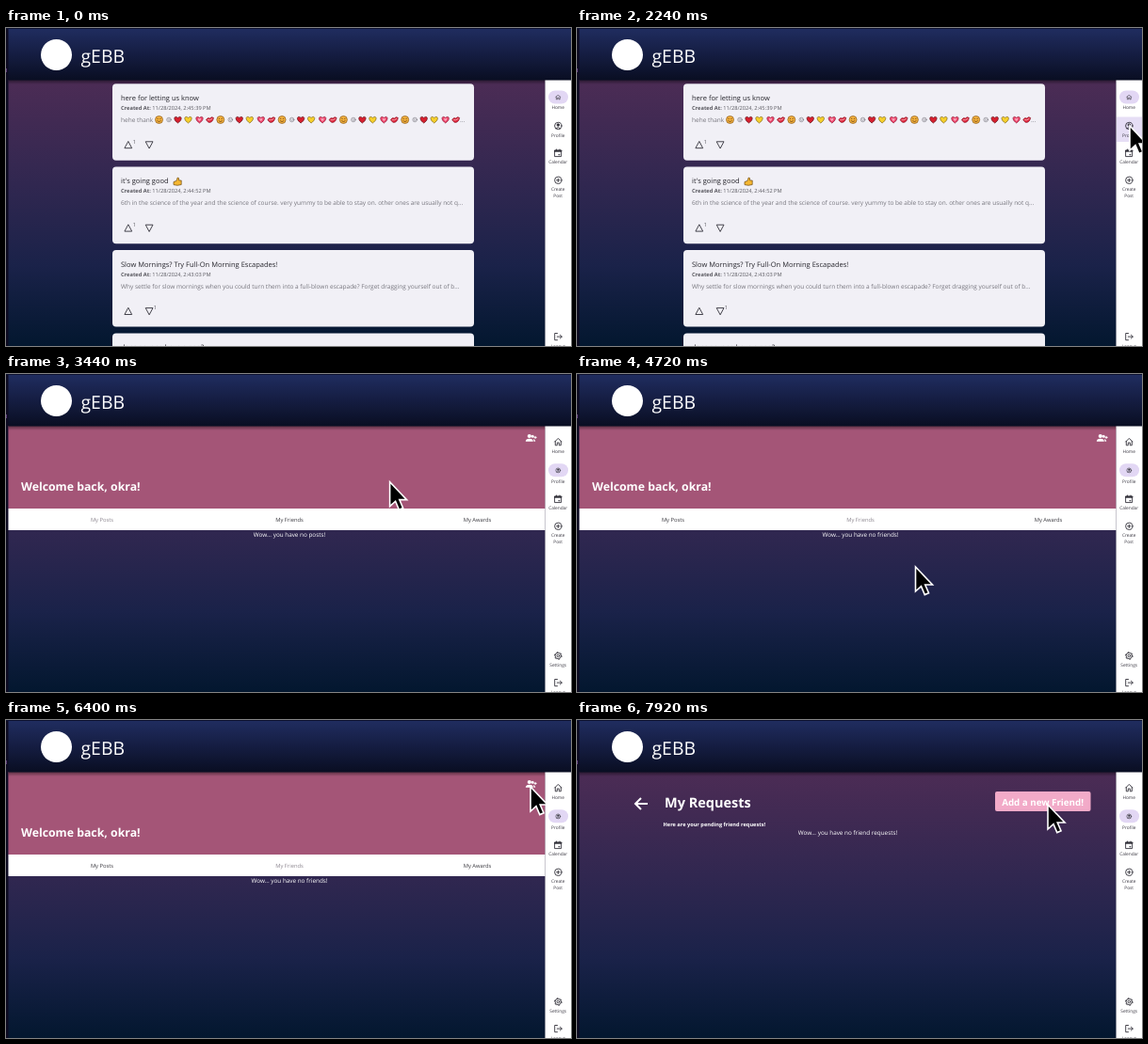
An HTML page for the animation above (8 s loop, 600 by 338 pixels).

```html
<!DOCTYPE html>
<html lang="en">
<head>
<meta charset="utf-8">
<style>
  html, body { margin: 0; width: 100%; height: 100%; overflow: hidden; background: #0c0a20; }
  svg { display: block; width: 600px; height: 338px; font-family: "Open Sans", "Noto Sans", sans-serif; text-rendering: geometricPrecision; }
  .line { fill: none; stroke: #33323a; stroke-width: .9; stroke-linejoin: round; stroke-linecap: round; }
  .mid { text-anchor: middle; }
  .white { fill: #fff; }
  .bold { font-weight: 700; }
  .title { font-size: 7.5px; font-weight: 500; fill: #26252c; }
  .date { font-size: 5.7px; fill: #5a5960; }
  .body { font-size: 6.5px; fill: #77767e; }
  .nav { font-size: 4.8px; fill: #3c3a44; text-anchor: middle; }
  .tab { font-size: 5.8px; font-weight: 500; text-anchor: middle; fill: #3b3a40; }
  .tab.on { fill: #8d8790; }
  .note { font-size: 6.35px; font-weight: 500; fill: #fff; text-anchor: middle; }
</style>
</head>
<body>
<svg viewBox="0 0 600 338">
  <defs>
    <linearGradient id="page" x2="0" y2="1">
      <stop stop-color="#4c2c55"/><stop offset=".4" stop-color="#302750"/>
      <stop offset=".7" stop-color="#1a2249"/><stop offset="1" stop-color="#03172f"/>
    </linearGradient>
    <linearGradient id="bar" x2="0" y2="1">
      <stop stop-color="#202d60"/><stop offset=".5" stop-color="#151d42"/><stop offset="1" stop-color="#090e22"/>
    </linearGradient>
    <linearGradient id="shade" x2="0" y2="1">
      <stop stop-color="#000" stop-opacity=".45"/><stop offset="1" stop-color="#000" stop-opacity="0"/>
    </linearGradient>
    <path id="heart" d="M0 3.5C-6.5-1-3-5.2 0-2C3-5.2 6.5-1 0 3.5Z"/>
    <g id="smile">
      <circle r="4" fill="#f3b13c" stroke="#8a5a1c" stroke-width=".7"/>
      <path d="M-2-1h1.2M.8-1H2M-2 1Q0 3.2 2 1" fill="none" stroke="#6b3f12" stroke-width=".8"/>
    </g>
    <g id="face" class="line" style="stroke:#77767e;stroke-width:.6">
      <circle r="2.3"/><path d="M-1 .5Q0 1.6 1 .5M-.8-.7v.1M.8-.7v.1"/>
    </g>
    <g id="lips">
      <path d="M-4 0Q-2-3 0-1.4Q2-4 4-2Q3 3-1 3Q-3 2-4 0Z" fill="#e0263c" stroke="#7c1424" stroke-width=".6"/>
      <path d="M-2.5 .2Q0 1 2.7-1.2" fill="none" stroke="#fff" stroke-width=".6"/>
    </g>
  </defs>

  <rect x="2.5" y="55" width="570" height="283" fill="url(#page)"/>
  <g id="home"></g>

  <g id="profile">
    <rect x="2.5" y="55" width="570" height="88" fill="#a45577"/>
    <g class="white">
      <circle cx="555.8" cy="66" r="2.1"/><path d="M551.8 71.8q0-3 4-3t4 3z"/>
      <circle cx="559.2" cy="66.2" r="1.5"/><path d="M560 69q2.2.5 2.2 2.8h-1.6z"/>
      <path d="M560.6 67.4h3M562.1 65.9v3" stroke="#fff"/>
    </g>
    <text class="white bold" x="16" y="123.5" font-size="12.3">Welcome back, okra!</text>
    <rect x="2.5" y="143" width="570" height="23" fill="#fff"/>
    <text class="tab" x="102" y="156.7">My Posts</text>
    <text class="tab" x="301" y="156.7">My Friends</text>
    <text class="tab" x="500.5" y="156.7">My Awards</text>
    <text class="note" x="301" y="173.2" id="empty"></text>
  </g>

  <g id="requests">
    <path d="M75 89H62.5M68 83l-6 6l6 6" fill="none" stroke="#fff" stroke-width="2"/>
    <text class="white bold" x="93" y="93" font-size="14.5">My Requests</text>
    <text class="white bold" x="91.5" y="112.6" font-size="5.63">Here are your pending friend requests!</text>
    <text class="note" x="287.5" y="122.3">Wow... you have no friend requests!</text>
    <rect id="button" x="444" y="76" width="101.5" height="21" rx="2"/>
    <text class="white bold mid" x="494.6" y="90.5" font-size="9.75">Add a new Friend!</text>
  </g>

  <rect x="2.5" y="55" width="570" height="5" fill="url(#shade)"/>
  <rect x="2.5" width="598" height="55.5" fill="url(#bar)"/>
  <rect width="600" height="1" fill="#0d1230"/>
  <rect y="43" width="1" height="4" fill="#5b3a78"/>
  <circle class="white" cx="53.5" cy="28.5" r="16.5"/>
  <text class="white" x="79.5" y="37" font-size="19.4">gEBB</text>

  <rect x="572.5" y="55.5" width="27.5" height="283" fill="#fff"/>
  <rect id="hover" x="573" y="94.5" width="27" height="26.5" fill="#e6def5"/>
  <rect id="pill" x="576" width="21" height="14" rx="7" fill="#e2d7f4"/>
  <path id="homeIcon" class="line" d="M-3.6 0L0-3.6L3.6 0M-3-.6V3.8H-1V1H1V3.8H3V-.6"/>
  <text class="nav" id="homeLabel" x="586.2">Home</text>
  <g id="userIcon" class="line">
    <circle r="3.7"/><circle cy="-1" r="1.2" fill="#33323a"/><path d="M-2.4 2.6Q0 .4 2.4 2.6"/>
  </g>
  <text class="nav" x="586.2" y="115.7">Profile</text>
  <g class="line">
    <path d="M583 130h6.6v6.6H583zM583 131h6.6M584.5 129v1M588 129v1"/>
    <path d="M583 130.6h6.6" stroke-width="1.8"/><path d="M587.3 134.4h.6v.6h-.6z"/>
    <circle cx="586.3" cy="161.8" r="3.7"/><path d="M584.6 161.8h3.4M586.3 160.1v3.4"/>
  </g>
  <text class="nav" x="586.2" y="144.3">Calendar</text>
  <text class="nav" x="586.2" y="173.2">Create</text>
  <text class="nav" x="586.2" y="180.2">Post</text>
  <g id="settings">
    <g class="line">
      <circle cx="586.3" cy="299.5" r="3.2"/><circle cx="586.3" cy="299.5" r="1.3"/>
      <circle cx="586.3" cy="299.5" r="3.9" stroke-dasharray="1.6 2.48" stroke-linecap="butt"/>
    </g>
    <text class="nav" x="586.2" y="311.3">Settings</text>
  </g>
  <path class="line" d="M585.5 324.5H582.7V331.7H585.5M585.3 328.1H590.2M588.4 326.2L590.3 328.1L588.4 330"/>
  <text class="nav" x="586.2" y="339.6">Logout</text>

  <path id="cursor" d="M0 0V26L6 20.6L9.8 29.6L14 27.8L10.2 19H18Z" fill="#000" stroke="#fff" stroke-width="1.6"/>
</svg>
<script>
const $ = id => document.getElementById(id);
const show = (id, on) => $(id).style.display = on ? '' : 'none';

function emojiRow(y) {
  const glyph = (id, x, fill, line) =>
    `<use href="#${id}" x="${x}" y="${y}" fill="${fill}" stroke="${line}" stroke-width=".7"/>`;
  let out = '';
  for (let i = 0; i < 5; i++) {
    const x = 162.5 + i * 65.3;
    out += glyph('smile', x) + glyph('face', x + 10.5) +
      glyph('heart', x + 20, '#d8202f', '#5c0d16') +
      glyph('heart', x + 31, '#f7d02c', '#7d6312') +
      glyph('heart', x + 43, '#f0466c', '#8e1c38') +
      `<use href="#heart" fill="#f9a3b8" transform="translate(${x + 43} ${y}) scale(.45)"/>` +
      glyph('lips', x + 54);
  }
  return out;
}

const posts = [
  ['here for letting us know', '2:45:39', 'hehe thank', 1, 0],
  ["it's going good", '2:44:52', '6th in the science of the year and the science of course. very yummy to be able to stay on. other ones are usually not q...', 1, 0],
  ['Slow Mornings? Try Full-On Morning Escapades!', '2:43:03', 'Why settle for slow mornings when you could turn them into a full-blown escapade? Forget dragging yourself out of b...', 0, 1],
  ['does anyone have a pen?', '2:41:20', '', 0, 0]
];
$('home').innerHTML = posts.map(([title, time, body, up, down], i) => `
  <g transform="translate(0 ${i * 88.4})">
    <rect x="113" y="59.2" width="384" height="81.6" rx="4" fill="#f1f0f6"/>
    <text class="title" x="122" y="77">${title}</text>
    <text class="date" x="122" y="87"><tspan class="bold">Created At:</tspan> 11/28/2024, ${time} PM</text>
    <text class="body" x="122" y="100">${body}</text>
    <path class="line" d="M126.3 127.7h7.4L130 120.8ZM148.6 120.8h7.4L152.3 127.7Z"/>
    <g class="date"><text x="134.8" y="122.5">${up || ''}</text><text x="156.8" y="122.5">${down || ''}</text></g>
  </g>`).join('') + emojiRow(97.5) +
  '<text class="body" x="482" y="100">...</text>' +
  '<path d="M178 163.5L181 162.5L182.2 159Q184 158.6 183.6 162H186.2V166.5Q182 168 178 166.6Z" fill="#f5b731" stroke="#6e4a12" stroke-width=".7"/>';

// Pointer stops: time, x, y
const stops = [
  [1250, 608, 150], [1650, 587, 104], [2700, 587, 104], [3430, 408, 114.5],
  [3740, 300, 154], [3980, 287, 149], [4200, 287, 149], [4700, 359.5, 205],
  [4940, 359.5, 205], [5980, 557, 71], [6400, 557, 71], [6940, 413.5, 121.5],
  [7040, 413.5, 121.5], [7920, 500, 90]
];
function pointer(t) {
  const i = stops.findIndex(s => s[0] > t);
  if (i < 1) return (i ? stops[stops.length - 1] : stops[0]).slice(1);
  const [a, b] = [stops[i - 1], stops[i]];
  const k = (t - a[0]) / (b[0] - a[0]), e = k * k * (3 - 2 * k);
  return [1, 2].map(n => a[n] + (b[n] - a[n]) * e);
}

const tabs = document.querySelectorAll('.tab');
function draw(now) {
  const t = now % 8000;
  const page = t < 2480 ? 'home' : t < 6440 ? 'profile' : 'requests';
  for (const id of ['home', 'profile', 'requests']) show(id, id === page);

  const atHome = page === 'home', friends = t >= 4200;
  tabs.forEach((tab, i) => tab.classList.toggle('on', i === +friends));
  $('empty').textContent = `Wow... you have no ${friends ? 'friends' : 'posts'}!`;

  show('settings', !atHome);
  $('pill').setAttribute('y', atHome ? 66.5 : 95.3);
  $('homeIcon').setAttribute('transform', atHome ? 'translate(586.3 73.4) scale(.65)' : 'translate(586.3 72)');
  $('homeLabel').setAttribute('y', atHome ? 86 : 83.7);
  $('userIcon').setAttribute('transform', atHome ? 'translate(586.3 104)' : 'translate(586.3 102.4) scale(.65)');

  const [x, y] = pointer(t);
  show('cursor', t >= 1250);
  $('cursor').setAttribute('transform', `translate(${x} ${y})`);
  show('hover', x > 573 && x < 600 && y > 94 && y < 121);
  $('button').setAttribute('fill', x > 444 && x < 545 && y > 76 && y < 97 ? '#f2aac8' : '#1d1530');
  requestAnimationFrame(draw);
}
draw(0);
</script>
</body>
</html>
```
